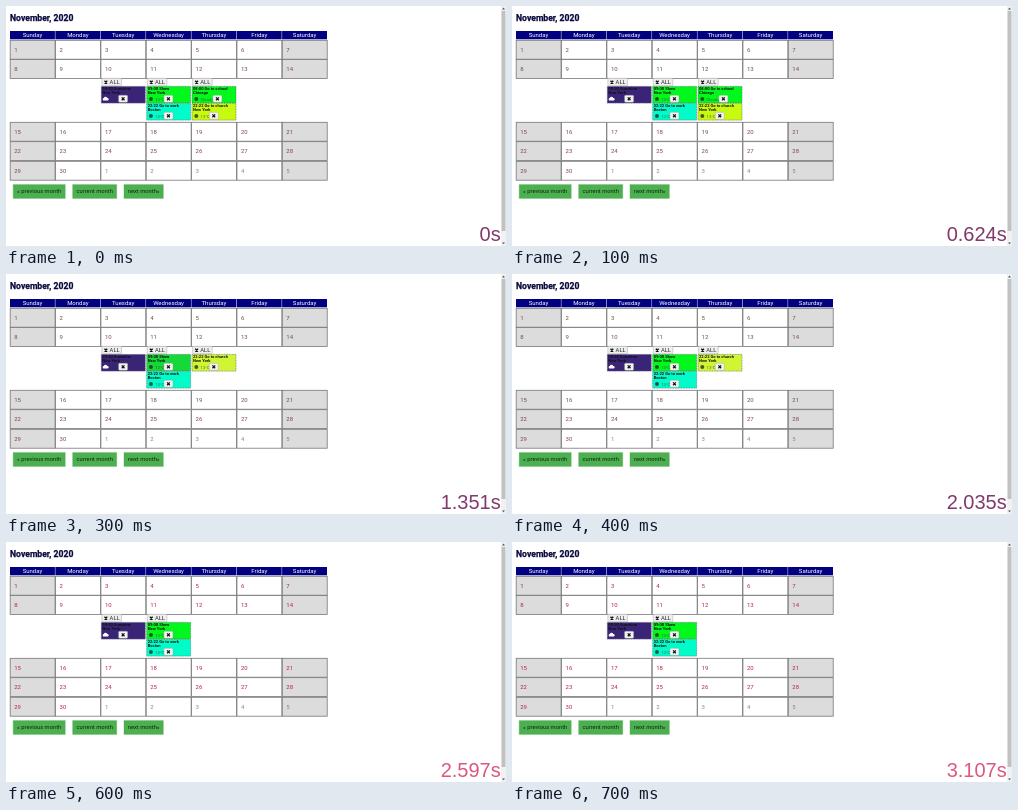
An HTML page that plays this animation: 500x240 px, repeating every 0.8 s.

```html
<!DOCTYPE html>
<html lang="en">
<head>
<meta charset="utf-8">
<style>
html, body { margin: 0; width: 100%; height: 100%; overflow: hidden; background: #fff; }
svg { display: block; width: 500px; height: 240px; font-family: Roboto, sans-serif; }
</style>
</head>
<body>
<svg id="stage" viewBox="0 0 500 240"></svg>
<script>
const stage = document.getElementById('stage');
const days = ['Sunday', 'Monday', 'Tuesday', 'Wednesday', 'Thursday', 'Friday', 'Saturday'];
const rowTops = [34, 53.2, 116, 135.4, 155];
const colX = i => 4 + i * 45.35;

// One entry per 100 ms: clock, clock colour, day colour, green card colour, Thursday events
const steps = [
  ['0s', '#82396a', '#794b43', '#00f81c', 2],
  ['0.624s', '#82396a', '#794b43', '#00f81c', 2],
  ['1.248s', '#82396e', '#98464a', '#00ea1c', 2],
  ['1.351s', '#82396e', '#794b43', '#16d838', 1],
  ['2.035s', '#82396e', '#794b43', '#00f81c', 1],
  ['2.087s', '#dd5880', '#b52444', '#00f81c', 0],
  ['2.597s', '#dd5880', '#b52444', '#00f81c', 0],
  ['3.107s', '#dd5880', '#b52444', '#00f81c', 0]
];

const rect = (x, y, w, h, fill, more = '') =>
  `<rect x="${x}" y="${y}" width="${w}" height="${h}" fill="${fill}" ${more}/>`;
const text = (x, y, size, fill, str, more = '') =>
  `<text x="${x}" y="${y}" font-size="${size}" fill="${fill}" ${more}>${str}</text>`;
const cross = (x, y, r) =>
  `<path d="M${x - r} ${y - r}l${2 * r} ${2 * r}m0 ${-2 * r}l${-2 * r} ${2 * r}" stroke="#111" stroke-width="1.3"/>`;

function calendar(dayColor) {
  let out = text(4, 15.3, 8.65, '#08083c', 'November, 2020', 'font-weight="700" stroke="#08083c" stroke-width=".25"');
  days.forEach((day, i) => {
    out += rect(colX(i), 25, 44.9, 8.3, '#000080');
    out += text(colX(i) + 22.5, 31.3, 6, '#fff', day, 'text-anchor="middle"');
  });
  for (let n = 0; n < 35; n++) {
    const col = n % 7, x = colX(col), y = rowTops[Math.floor(n / 7)];
    const weekend = col === 0 || col === 6;
    out += rect(x + .2, y + .3, 44.9, 18.9, weekend ? '#dcdcdc' : '#fff', 'stroke="#777" stroke-width=".8"');
    out += text(x + 4.2, y + 11.5, 6, n < 30 ? dayColor : '#888', n % 30 + 1);
  }
  return out;
}

function allButton(col) {
  const x = colX(col) + 1.2;
  return rect(x, 72.3, 19.6, 7.6, '#efefef', 'rx="1" stroke="#aaa" stroke-width=".5"') +
    cross(x + 4, 76.1, 1.4) + text(x + 7.7, 78.2, 5.8, '#222', 'ALL');
}

function card(col, slot, fill, title, place, weather = '13°C', shift = 0) {
  const x = colX(col) + .6, y = 80.4 + slot * 17, closeX = x + 17.3 + shift;
  let out = rect(x, y, 44, 16.7, fill, 'stroke="#667" stroke-width=".6" stroke-dasharray="1 .6"');
  out += text(x + 1, y + 3.9, 4.1, '#111', title, 'font-weight="700"');
  out += text(x + 1, y + 8, 4.1, '#111', place, 'font-weight="700"');
  out += col === 2
    ? `<path d="M${x + 2} ${y + 14}a1.3 1.3 0 0 1 .5-2.4a1.8 1.8 0 0 1 3.4 0a1.2 1.2 0 0 1 .5 2.4z" fill="#fff"/>`
    : `<circle cx="${x + 4.3}" cy="${y + 12.6}" r="2" fill="#222" fill-opacity=".75"/>`;
  out += text(x + 8.6, y + 14.2, 4.2, '#333', weather, 'fill-opacity=".7"');
  out += rect(closeX, y + 8.9, 9, 7, '#f4f4f4', 'rx="1" stroke="#999" stroke-width=".4"');
  return out + cross(closeX + 4.5, y + 12.4, 1.4);
}

function events(count, green) {
  let out = allButton(2) + allButton(3);
  out += card(2, 0, '#3a2478', '09:30 Sunshine', 'New York');
  out += card(3, 0, green, '09:00 Show', 'New York');
  out += card(3, 1, '#00fcc8', '22:22 Go to work', 'Boston');
  if (count) out += allButton(4);
  if (count === 2) out += card(4, 0, green, '08:00 Go to school', 'Chicago', 'Cloudy', 3.6);
  if (count) out += card(4, count - 1, count === 2 ? '#c8fa10' : '#d0f535', '22:22 Go to church', 'New York');
  return out;
}

function controls() {
  const buttons = [[7.2, 52, '« previous month'], [66.7, 44, 'current month'], [118, 39.3, 'next month»']];
  return buttons.map(([x, w, label]) =>
    rect(x, 178.6, w, 13.8, '#4caf50', 'stroke="#4caf50" stroke-opacity=".4"') +
    text(x + w / 2, 187.4, 5.8, '#10240f', label, 'text-anchor="middle"')).join('');
}

function scrollbar() {
  return rect(495, 0, 5, 240, '#f1f1f1') + rect(495.6, 5, 3.8, 220, '#c1c1c1') +
    '<path d="M496 3.4l1.5-1.8 1.5 1.8zM496 236.4l1.5 1.8 1.5-1.8z" fill="#555"/>';
}

const scenes = steps.map(([clock, clockColor, dayColor, green, count]) =>
  calendar(dayColor) + events(count, green) + controls() + scrollbar() +
  text(494.7, 235, 20, clockColor, clock, 'text-anchor="end" font-family="Liberation Sans, Arial, sans-serif"'));

let shown = -1;
function draw() {
  const step = Math.floor(performance.now() % 800 / 100);
  if (step !== shown) stage.innerHTML = scenes[shown = step];
  requestAnimationFrame(draw);
}
draw();
</script>
</body>
</html>
```
